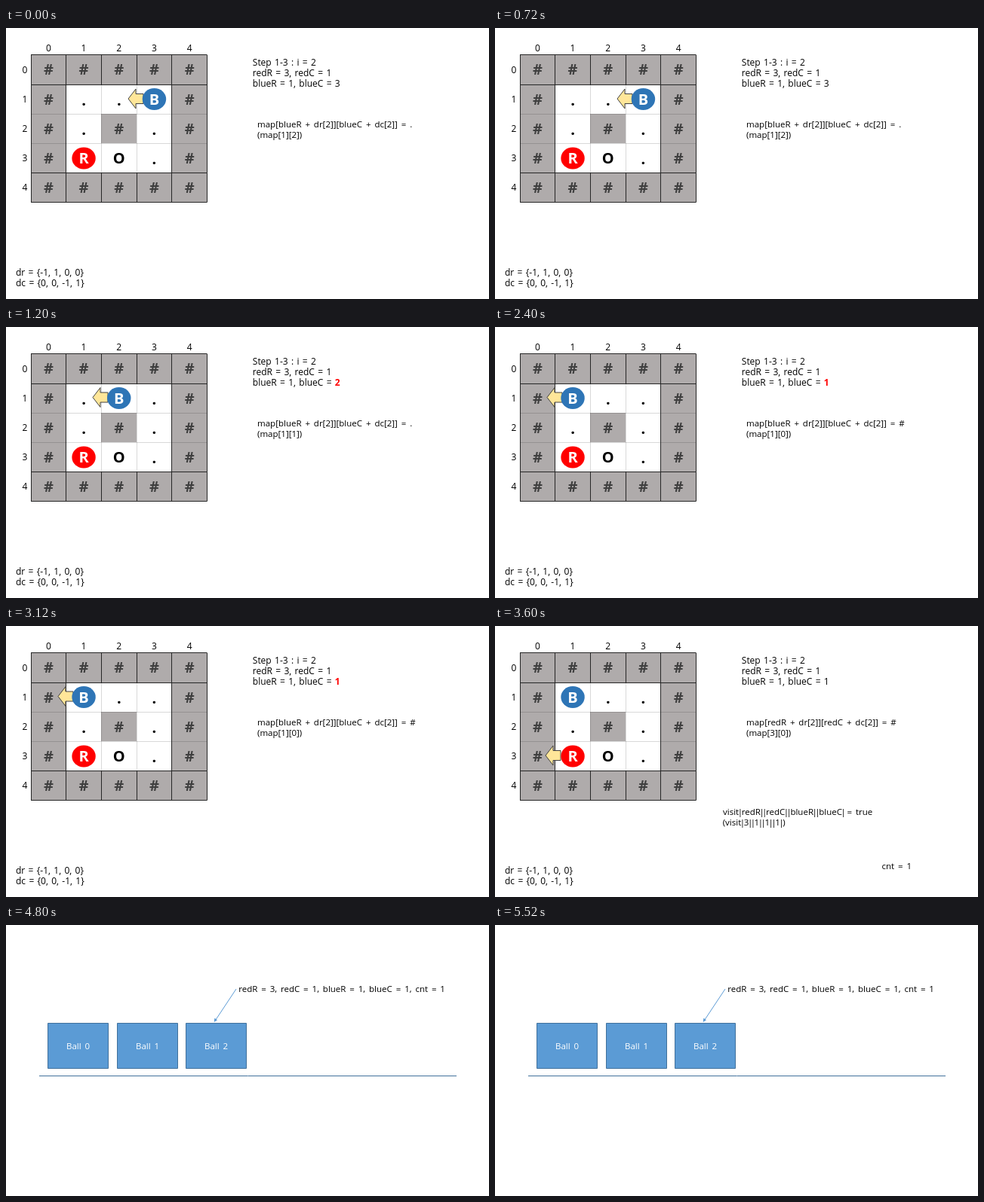
Recreate the animation shown at these times as an HTML page with a canvas. Size 640x360 px, loop 6 s.

```html
<!DOCTYPE html>
<html lang="en">
<head>
<meta charset="utf-8">
<title>Marble board search</title>
<style>
html, body { margin: 0; width: 100%; height: 100%; overflow: hidden; background: #fff; }
canvas { display: block; width: 640px; height: 360px; }
</style>
</head>
<body>
<canvas id="stage" width="640" height="360"></canvas>
<script>
const ctx = document.getElementById('stage').getContext('2d');
const FONT = '"Open Sans", "Noto Sans", sans-serif';
const STEP = 1200;
const GRID = { x: 33, y: 35.9, w: 46.7, h: 39.1 };
const BOARD = ['#####', '#...#', '#.#.#', '#.O.#', '#####'];
const BLUE = '#2e75b6', RED = '#ff0000', EDGE = '#41719c', SKY = '#5b9bd5';
const DARK = '#262626', FAINT = 'rgba(0, 0, 0, 0.15)';
const AIRY = { size: 11.5, space: 1.9 };

const steps = [
  { blue: 3, blueC: '3', arrow: [162, 94], probe: ['blue', '.', '1][2'] },
  { blue: 2, blueC: '2', hot: true, arrow: [115, 93.5], probe: ['blue', '.', '1][1'] },
  { blue: 1, blueC: '1', hot: true, arrow: [69, 93.5], probe: ['blue', '#', '1][0'] },
  { blue: 1, blueC: '1', arrow: [67, 172], probe: ['red', '#', '3][0'], done: true }
];

const gridX = i => GRID.x + i * GRID.w;
const gridY = i => GRID.y + i * GRID.h;
const colX = c => gridX(c + 0.5);
const rowY = r => gridY(r + 0.5);

// Draws text and returns the x where it ends.
function label(s, x, y, { color = '#000', size = 12, weight = 400, align = 'left', space = 1.2 } = {}) {
  ctx.font = `${weight} ${size}px ${FONT}`;
  ctx.wordSpacing = `${space}px`;
  ctx.textAlign = align;
  ctx.fillStyle = color;
  ctx.fillText(s, x, y);
  return x + ctx.measureText(s).width;
}

// Text whose bars sit tight against their neighbours.
function barLabel(s, x, y) {
  const gap = 3.6;
  for (const part of s.split(/(\|)/)) {
    if (part === '|') {
      label(part, x + gap / 2, y, { ...AIRY, align: 'center' });
      x += gap;
    } else if (part) {
      x = label(part, x, y, AIRY);
    }
  }
}

function line(x1, y1, x2, y2, color) {
  ctx.strokeStyle = color;
  ctx.lineWidth = 1;
  ctx.beginPath();
  ctx.moveTo(x1, y1);
  ctx.lineTo(x2, y2);
  ctx.stroke();
}

function polygon(points, fill, stroke) {
  ctx.beginPath();
  points.forEach(([x, y]) => ctx.lineTo(x, y));
  ctx.closePath();
  ctx.fillStyle = fill;
  ctx.fill();
  if (stroke) {
    ctx.strokeStyle = stroke;
    ctx.lineWidth = 1;
    ctx.stroke();
  }
}

function marble(letter, x, y, color) {
  ctx.fillStyle = color;
  ctx.beginPath();
  ctx.ellipse(x, y, 15.7, 14.4, 0, 0, Math.PI * 2);
  ctx.fill();
  label(letter, x, y + 7.2, { color: '#fff', size: 20, weight: 700, align: 'center' });
}

function pointer([x, y]) {
  const shape = [[0, 0], [10, -13], [10, -6.5], [20, -6.5], [20, 6.5], [10, 6.5], [10, 13]];
  polygon(shape.map(([dx, dy]) => [x + dx, y + dy]), '#ffe699', '#404040');
}

// Lines inside the middle area are barely visible.
function gridLines() {
  for (let i = 0; i <= 5; i++) {
    const x = Math.floor(gridX(i)) + 0.5;
    const y = Math.floor(gridY(i)) + 0.5;
    const inner = i === 2 || i === 3;
    const color = inner ? FAINT : DARK;
    line(x, gridY(0), x, gridY(1), DARK);
    line(x, gridY(1), x, gridY(4), color);
    line(x, gridY(4), x, gridY(5), DARK);
    line(gridX(0), y, gridX(5), y, color);
  }
}

function board(blueCol) {
  BOARD.forEach((row, r) => {
    [...row].forEach((cell, c) => {
      if (cell !== '#') return;
      const x = Math.floor(gridX(c)), y = Math.floor(gridY(r));
      ctx.fillStyle = '#afabab';
      ctx.fillRect(x, y, Math.floor(gridX(c + 1)) - x, Math.floor(gridY(r + 1)) - y);
    });
  });
  gridLines();
  BOARD.forEach((row, r) => {
    label(r, 25, rowY(r) + 4.5, { align: 'center' });
    label(r, colX(r), 31, { align: 'center' });
    [...row].forEach((cell, c) => {
      const covered = c === 1 && r === 3 || c === blueCol && r === 1;
      if (covered) return;
      label(cell, colX(c), rowY(r) + (cell === '.' ? 8 : 7), {
        color: cell === '#' ? '#3f3f3f' : '#000', size: 20, weight: 700, align: 'center'
      });
    });
  });
}

function boardScene(s) {
  board(s.blue);
  pointer(s.arrow);
  marble('B', colX(s.blue), 94.5, BLUE);
  marble('R', colX(1), 173, RED);

  label('Step 1-3 : i = 2', 326.8, 50);
  label('redR = 3, redC = 1', 326.8, 64);
  const end = label('blueR = 1, blueC = ', 326.8, 78);
  label(s.blueC, end, 78, s.hot ? { color: RED, weight: 700 } : {});

  const [ball, found, cell] = s.probe;
  label(`map[${ball}R + dr[2]][${ball}C + dc[2]] = ${found}`, 333, 132, AIRY);
  label(`(map[${cell}])`, 333, 146, AIRY);
  label('dr = {-1, 1, 0, 0}', 13, 329);
  label('dc = {0, 0, -1, 1}', 13, 343);

  if (s.done) {
    barLabel('visit|redR||redC||blueR||blueC| = true', 302, 251);
    barLabel('(visit|3||1||1||1|)', 301.7, 265);
    label('cnt = 1', 512.5, 323, AIRY);
  }
}

function queueScene() {
  for (let i = 0; i < 3; i++) {
    const x = 55.5 + Math.round(i * 91.5);
    polygon([[x, 130.5], [x + 80, 130.5], [x + 80, 190.5], [x, 190.5]], SKY, EDGE);
    label(`Ball ${i}`, x + 40, 165, { ...AIRY, color: '#fff', align: 'center' });
  }
  line(44, 200.5, 597, 200.5, EDGE);
  line(305, 85, 277.5, 126.5, SKY);
  polygon([[275.7, 129], [276.3, 123.8], [280, 126.3]], SKY);
  label('redR = 3, redC = 1, blueR = 1, blueC = 1, cnt = 1', 308.3, 89, AIRY);
}

function draw(now) {
  const i = Math.floor(now / STEP) % 5;
  ctx.fillStyle = '#fff';
  ctx.fillRect(0, 0, 640, 360);
  if (i < 4) boardScene(steps[i]);
  else queueScene();
}

let start;
function tick(now) {
  start ??= now;
  draw(now - start);
  requestAnimationFrame(tick);
}
draw(0);
requestAnimationFrame(tick);
</script>
</body>
</html>
```
